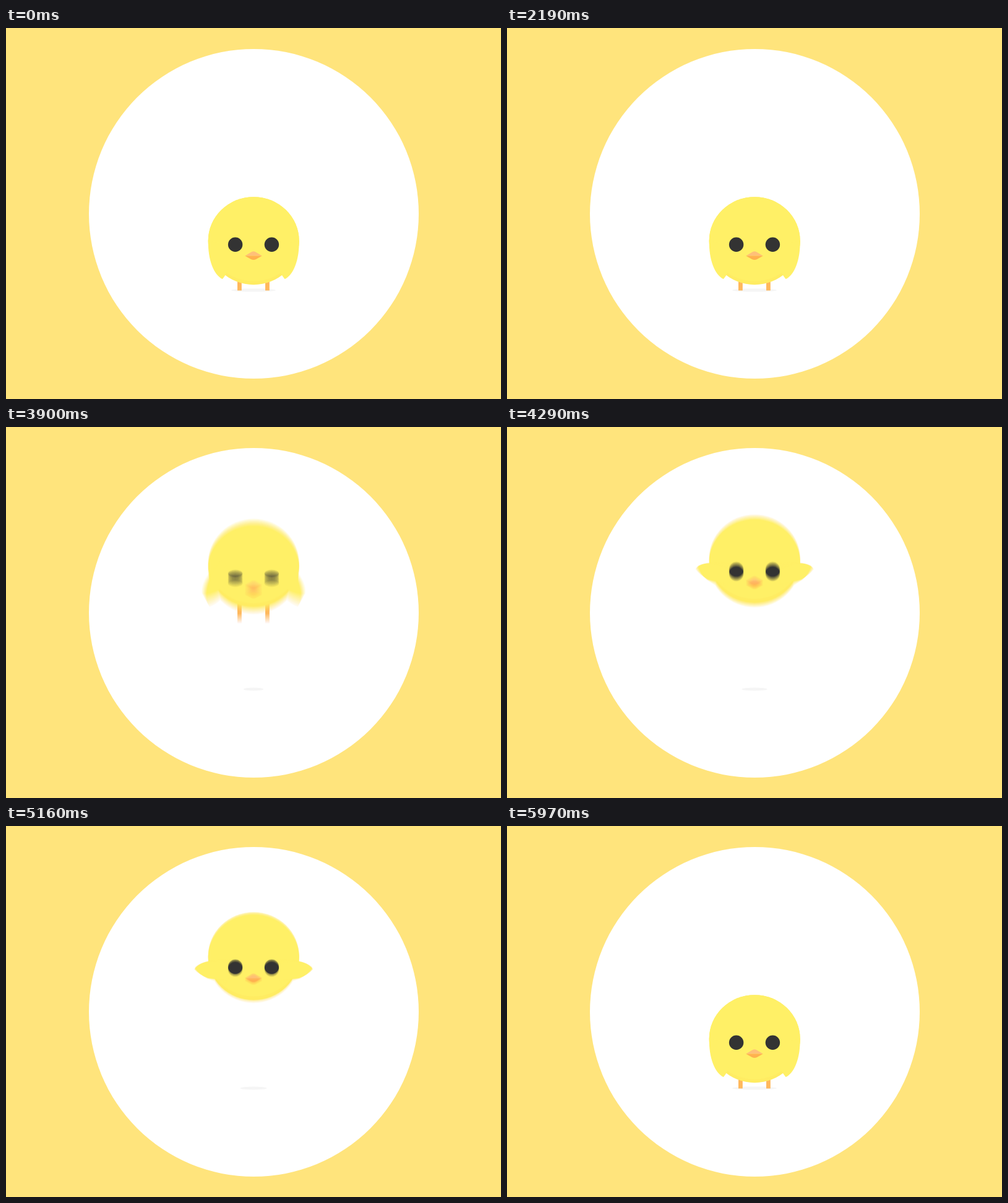
Recreate the animation shown at these times as an HTML page with a canvas. Size 800 by 600 pixels, loop 6.3 s.

```html
<!DOCTYPE html>
<html lang="en">
<head>
<meta charset="utf-8">
<title>Chick</title>
<style>
html, body { margin: 0; height: 100%; overflow: hidden; background: #ffe47c; }
canvas { display: block; }
</style>
</head>
<body>
<canvas id="stage" width="800" height="600"></canvas>
<script>
const LOOP = 6300, STEP = 30, SHUTTER = 50, SAMPLES = 16;
const JUMP = 3500, AIR = 4000, FALL = 5420, LAND = 5868, HEIGHT = 142, FLAP = 710 / 3;
const out = document.getElementById('stage').getContext('2d');
const layer = document.createElement('canvas');
layer.width = 800;
layer.height = 600;
const c = layer.getContext('2d');

function pose(t) {
  const ramp = (a, b) => Math.min(1, Math.max(0, (t - a) / (b - a)));
  const ease = (a, b) => ramp(a, b) ** 2 * (3 - 2 * ramp(a, b));
  const fall = (a, b) => ramp(a, b) ** 2;
  const bump = (a, b) => Math.sin(Math.PI * ramp(a, b));

  // Flapping goes 0..2 and stops at 0 outside the hover.
  const flap = 1 - Math.cos(2 * Math.PI * ramp(AIR, FALL) * (FALL - AIR) / FLAP);
  const turnDip = 4 * (bump(210, 780) + bump(1050, 1600) + bump(1830, 2160));
  const crouch = 8 * (ease(2970, 3350) - ease(JUMP, AIR));
  const flight = (HEIGHT - 8) * ease(JUMP, AIR) + 8 * ease(FALL, 5510) - HEIGHT * fall(5510, LAND);
  return {
    look: ease(210, 780) - 2 * ease(1050, 1600) + ease(1830, 2160),
    y: turnDip + crouch - flight + 7.5 * flap + 12 * bump(LAND, 5945),
    face: 20.5 * ease(3570, 3800) - 9.5 * ease(2480, 2750) + 8 * bump(3700, 3910) - 11 * ease(5520, 5700),
    lid: 1 - .55 * bump(3800, AIR),
    legs: 5 * ease(JUMP, 3800) - 21 * ease(3880, 4080) + 16 * ease(5560, 5800),
    wing: 97 * fall(3720, AIR) + 19 * flap + 20 * ease(FALL, 5610) - 117 * ease(5700, 5900),
    shadow: 36 - 20 * ease(JUMP, 3880) + 5.5 * ease(3920, AIR) - 2.5 * flap + 14.5 * ease(FALL, 5900)
  };
}

function ellipse(x, y, rx, ry, color) {
  c.fillStyle = color;
  c.beginPath();
  c.ellipse(x, y, rx, ry, 0, 0, 2 * Math.PI);
  c.fill();
}

function shape(d, color) {
  c.fillStyle = color;
  c.fill(new Path2D(d));
}

function at(x, y, draw) {
  c.save();
  c.translate(x, y);
  draw();
  c.restore();
}

// side: 1 is the left wing, -1 its mirror image
function wing(side, p) {
  const drop = 2 * Math.abs(p.look) - 3 * side * p.look;
  at(400.2 - side * 55.3, 366 + drop, () => {
    c.scale(side, 1);
    c.rotate(p.wing * Math.PI / 180);
    shape('M-18-22C-19 8-9 34 5 40Q13 31 16 16L16-16Z', '#fff066');
  });
}

function body() {
  ellipse(400.2, 344.2, 73.5, 71, '#ffec62');
  c.save();
  c.clip();
  ellipse(400.2, 338.5, 75, 71, '#fff066');
  c.restore();
}

function face(p) {
  const tilt = p.look * 6 * Math.PI / 180;
  at(400 - 17.6 * p.look, 350.2 + p.face, () => {
    c.rotate(tilt);
    for (const x of [-29.4, 29.4]) ellipse(x, 0, 11.7, 11.7 * p.lid, '#333');
  });
  at(400 - 24.5 * p.look, 368.4 - Math.abs(p.look) + p.face, () => {
    c.rotate(tilt);
    shape('M-13.8 0L-3-6.3Q0-8 3-6.3L13.8 0Z', '#ffc078');
    shape('M-13.8 0L-4 5.6Q0 7.6 4 5.6L13.8 0Z', '#ffb14f');
  });
}

function scene(p) {
  c.fillStyle = '#ffe47c';
  c.fillRect(0, 0, 800, 600);
  ellipse(400.5, 300.5, 266.5, 266.5, '#fff');
  ellipse(400, 424, p.shadow, 2.6, '#f5f5f5');
  at(0, Math.min(0, p.y + p.legs), () => {
    c.fillStyle = '#ffb85c';
    for (const x of [374, 419]) c.fillRect(x, 398, 6.8, 26.5);
  });
  at(0, p.y, () => {
    body();
    wing(1, p);
    wing(-1, p);
    face(p);
  });
}

// Average several moments of the open shutter for motion blur.
function render(t) {
  for (let i = 0; i < SAMPLES; i++) {
    scene(pose(t + ((i + .5) / SAMPLES - .5) * SHUTTER));
    out.globalAlpha = 1 / (i + 1);
    out.drawImage(layer, 0, 0);
  }
}

const start = performance.now();
let shown = -1;
function tick() {
  const t = Math.floor((performance.now() - start) % LOOP / STEP) * STEP;
  if (t !== shown) render(shown = t);
  requestAnimationFrame(tick);
}
tick();
</script>
</body>
</html>
```
